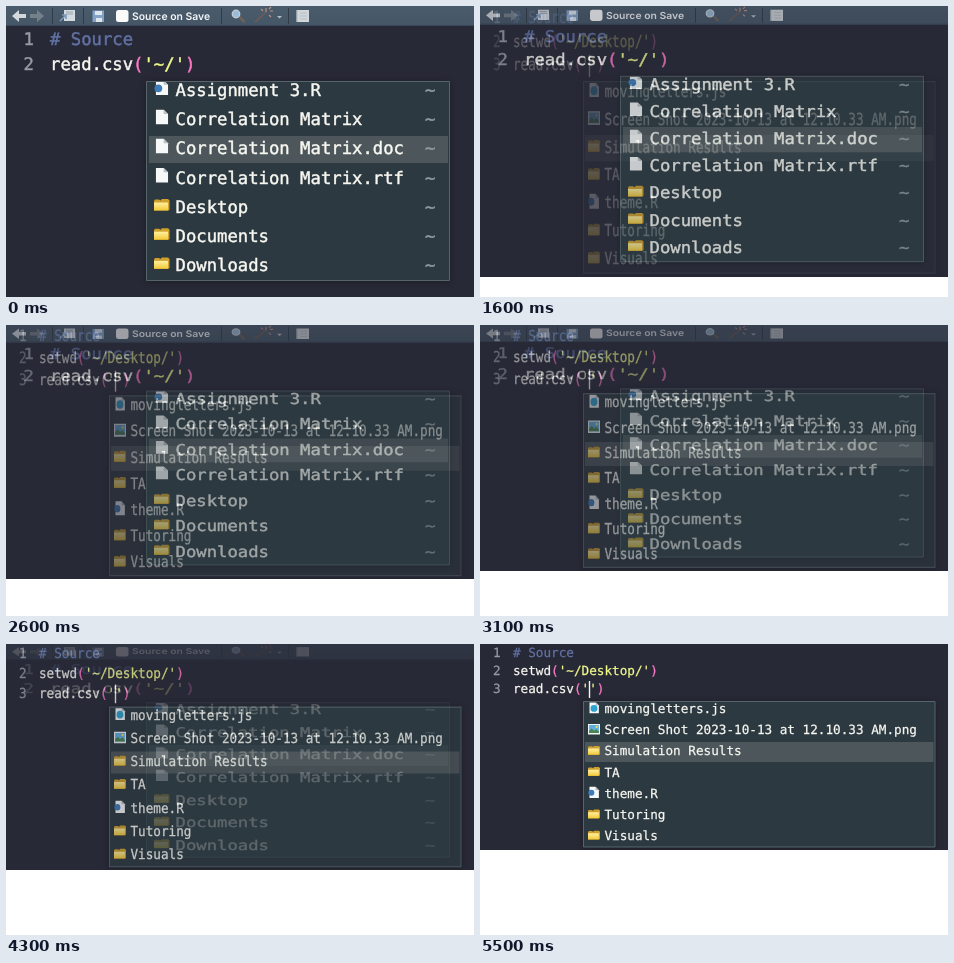
Animation, 468 px wide and 291 px high, one loop 8 s. Source, as an HTML page:

```html
<!DOCTYPE html>
<html lang="en">
<head>
<meta charset="utf-8">
<title>Editor path completion</title>
<style>
  html, body { margin: 0; width: 100%; height: 100%; overflow: hidden; background: #fff; }
  .stage { position: relative; width: 468px; height: 291px; overflow: hidden; background: #282936;
    animation: shrink 8s infinite; }
  .view { position: absolute; left: 0; top: 0; width: 468px; height: 100%; display: block; }
  .after { animation: appear 8s infinite; }

  /* 51 steps of 100 ms, the first one at 500 ms */
  @keyframes shrink {
    0% { height: 291px; }
    6.25% { height: 291px; animation-timing-function: steps(51, start); }
    70%, 100% { height: 206px; }
  }
  @keyframes appear {
    0% { opacity: 0; }
    6.25% { opacity: 0; animation-timing-function: steps(51, start); }
    70%, 100% { opacity: 1; }
  }

  text { font-family: "DejaVu Sans Mono", monospace; color: #f8f8f2; white-space: pre;
    text-rendering: geometricPrecision; }
  text, tspan { fill: currentColor; stroke: currentColor; }
  .large text { font-size: 17.25px; stroke-width: .45px; }
  .small text { font-size: 12.66px; stroke-width: .25px; }
  .large .label { font: 600 10.4px Inter, sans-serif; color: #f4f6f8; stroke: none; }
  text.num { color: #979ba3; }
  text.note { color: #6272a4; }
  .br { color: #ff79c6; }
  .str { color: #f1fa8c; }
  text.home { color: #929da2; }
  .menu { fill: #2d3941; stroke: #55656b; filter: drop-shadow(0 1px 3px #0005); }
  .pick { fill: #4d575b; }
  .sep { stroke: #2f3b48; }
</style>
</head>
<body>
<div class="stage">
  <svg class="view large" viewBox="0 0 468 291" preserveAspectRatio="none">
    <defs>
      <linearGradient id="bar" x2="0" y2="1">
        <stop stop-color="#4a5b6c"/><stop offset="1" stop-color="#455667"/>
      </linearGradient>
      <linearGradient id="gold" x2="0" y2="1">
        <stop stop-color="#fff0a0"/><stop offset="1" stop-color="#f2cb3c"/>
      </linearGradient>
      <symbol id="page" viewBox="0 0 16 16" overflow="visible">
        <path d="M2 0H10L14.5 4.5V15H2Z" fill="#f7f8f8"/>
        <path d="M10 0V4.5H14.5Z" fill="#b8c0c5"/>
      </symbol>
      <symbol id="script" viewBox="0 0 16 16" overflow="visible">
        <use href="#page" width="16" height="16"/>
        <circle cx="4.5" cy="8" r="4" fill="#3d7cba"/>
      </symbol>
      <symbol id="web" viewBox="0 0 16 16" overflow="visible">
        <use href="#page" width="16" height="16"/>
        <circle cx="8" cy="8.5" r="4.6" fill="#2fa3cf"/>
      </symbol>
      <symbol id="folder" viewBox="0 0 16 16" overflow="visible">
        <path d="M0 4L1 2.5H5L7 3.5L8 2H14.5L16 3.5V13L14.5 14H0Z" fill="#cfa02b"/>
        <path d="M0 5.5H14.5V13.5H0Z" fill="url(#gold)"/>
      </symbol>
      <symbol id="image" viewBox="0 0 16 16" overflow="visible">
        <path d="M0 1H16V15H0Z" fill="#eef3f5"/>
        <path d="M1.5 2.5H14.5V13H1.5Z" fill="#5eafe0"/>
        <path d="M1.5 13V10L5 7L8 10L11 8L14.5 11V13Z" fill="#4b8350"/>
        <circle cx="11.5" cy="5" r="1.5" fill="#f5dc70"/>
      </symbol>
      <clipPath id="listA"><path d="M141 76H444V274H141Z"/></clipPath>
      <clipPath id="listB"><path d="M103 58.5H455V203H103Z"/></clipPath>
    </defs>
    <path d="M0 0H468V291H0Z" fill="#282936"/>
    <path d="M0 0H468V20H0Z" fill="url(#bar)"/>
    <path d="M0 19.5H468" stroke="#3a4757"/>

    <path d="M6 10L13 4V8H20V12H13V16Z" fill="#d3d8dc"/>
    <path d="M38 10L31 4V8H24V12H31V16Z" fill="#74818b"/>
    <path class="sep" d="M46.5 2V18M77.5 2V18M215.5 2V18M282.5 2V18"/>
    <path d="M58 4H69V15H58Z" fill="#d3dae0"/>
    <path d="M60 6H67M60 8H67" stroke="#98a4af"/>
    <path d="M54 15L60 9M60 13V9H56" fill="none" stroke="#7d9ab8" stroke-width="1.6"/>
    <path d="M86.5 4.5H98V16H86.5Z" fill="#83a3c6"/>
    <path d="M89 5H96V9H89ZM90 12H96V16H90Z" fill="#dfe7ee"/>
    <rect x="110" y="4" width="12.5" height="12" rx="2.5" fill="#fafafa"/>
    <text class="label" x="126" y="13.5">Source on Save</text>
    <path d="M233 10.5L238.5 16" stroke="#6f6257" stroke-width="2.5"/>
    <circle cx="230" cy="8" r="3.8" fill="#9bbcd8" stroke="#c6d2db" stroke-width="1.2"/>
    <path d="M249 16L260 6" stroke="#655c59" stroke-width="2.2"/>
    <path d="M260 2V6M264 5H267M263 9L265 11M255 3L257 5M263 3L265 1" stroke="#b98e80" stroke-width="1.2"/>
    <path d="M271 10H276L273.5 12.5Z" fill="#b7bec6"/>
    <path d="M290.5 4H303V16H290.5Z" fill="#d0d6da"/>
    <path d="M294 7H301M294 10H301M294 13H301" stroke="#b5bec5"/>
    <path d="M291 5V16" stroke="#a5aeb7" stroke-width="1.5" stroke-dasharray="1.5 1.5"/>

    <text class="num" x="17.5" y="39">1</text>
    <text class="note" x="44" y="39"># Source</text>
    <text class="num" x="17.5" y="63.7">2</text>
    <text x="44" y="63.7">read.csv<tspan class="br">(</tspan><tspan class="str">'~/'</tspan><tspan class="br">)</tspan></text>

    <path class="menu" d="M140.5 75.5H443.5V274.5H140.5Z"/>
    <path class="pick" d="M143 130H442V157H143Z"/>
    <g id="rowsA" clip-path="url(#listA)"></g>
  </svg>

  <svg class="view after small" viewBox="0 0 468 206" preserveAspectRatio="none">
    <path d="M0 0H468V206H0Z" fill="#282936"/>
    <text class="num" x="13" y="13">1</text>
    <text class="note" x="33" y="13"># Source</text>
    <text class="num" x="13" y="31">2</text>
    <text x="33" y="31">setwd<tspan class="br">(</tspan><tspan class="str">'~/Desktop/'</tspan><tspan class="br">)</tspan></text>
    <text class="num" x="13" y="49">3</text>
    <text x="33" y="49">read.csv<tspan class="br">(</tspan><tspan class="str">''</tspan><tspan class="br">)</tspan></text>
    <path d="M109.5 37V54" stroke="#f8f8f2" stroke-width="1.4"/>

    <path class="menu" d="M103.5 57.5H455V203H103.5Z"/>
    <path class="pick" d="M105 98H453.5V118H105Z"/>
    <g id="rowsB" clip-path="url(#listB)"></g>
  </svg>
</div>
<script>
  function fillList(id, rows, { x, y, step, icon, size, lift, home }) {
    document.getElementById(id).innerHTML = rows.map(([kind, name], i) => {
      const base = y + step * i;
      return `<use href="#${kind}" x="${icon}" y="${base - lift}" width="${size}" height="${size}"/>
        <text x="${x}" y="${base}">${name}</text>` +
        (home ? `<text class="home" x="${home}" y="${base}">~</text>` : "");
    }).join("");
  }

  fillList("rowsA", [
    ["script", "Assignment 3.R"],
    ["page", "Correlation Matrix"],
    ["page", "Correlation Matrix.doc"],
    ["page", "Correlation Matrix.rtf"],
    ["folder", "Desktop"],
    ["folder", "Documents"],
    ["folder", "Downloads"]
  ], { x: 169.5, y: 90, step: 29.17, icon: 148, size: 15.5, lift: 15.5, home: 419 });

  fillList("rowsB", [
    ["web", "movingletters.js"],
    ["image", "Screen Shot 2023-10-13 at 12.10.33 AM.png"],
    ["folder", "Simulation Results"],
    ["folder", "TA"],
    ["script", "theme.R"],
    ["folder", "Tutoring"],
    ["folder", "Visuals"]
  ], { x: 124.5, y: 69, step: 21.2, icon: 108, size: 12, lift: 11 });
</script>
</body>
</html>
```
